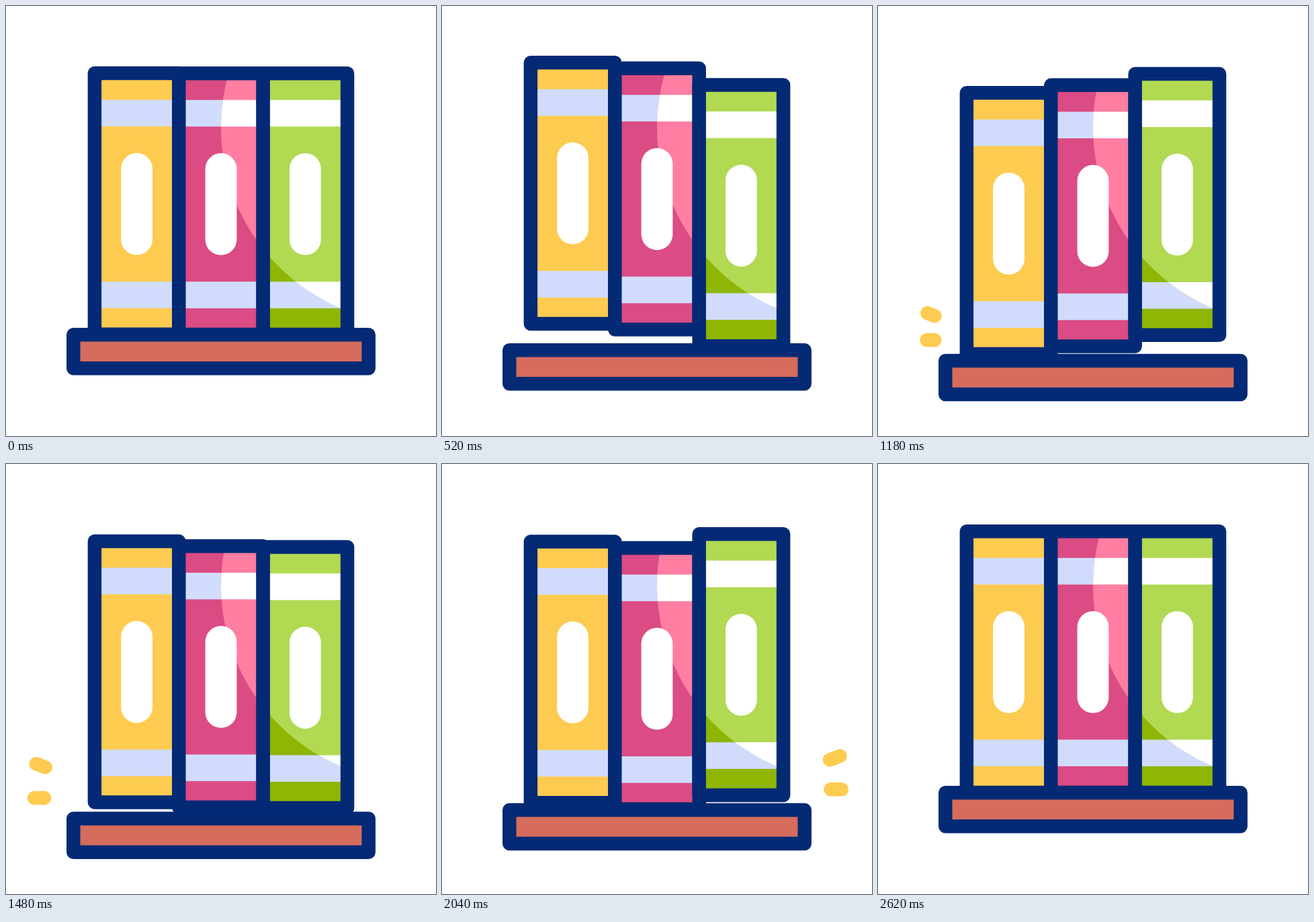
Write an HTML page with a canvas that moves like this. It is 640x640 px and loops after 3.6 s.

```html
<!DOCTYPE html>
<html lang="en">
<head>
<meta charset="utf-8">
<title>Bouncing books</title>
<style>
  html, body { margin: 0; width: 100%; height: 100%; overflow: hidden; background: #fff; }
  canvas { display: block; width: 640px; height: 640px; }
</style>
</head>
<body>
<canvas id="stage" width="640" height="640"></canvas>
<script>
const ctx = document.getElementById('stage').getContext('2d');
const LOOP = 3600, MOTION = 2620, HALF = MOTION / 2;
const NAVY = '#042a75', YELLOW = '#fdcb50', LAVENDER = '#d1dcfd', SHELF = '#d56c5c';
const BOOK_WIDTH = 125.4;

const books = [
  { x: 131.9, start: 0, rise: 420, dark: YELLOW, light: YELLOW },
  { x: 257.3, start: 225, rise: 600, dark: '#db4b84', light: '#ff7ea1' },
  { x: 382.7, start: 479, rise: 600, dark: '#8fb505', light: '#b1d952' },
];

const clamp = v => Math.min(1, Math.max(0, v));
const smooth = v => { v = clamp(v); return v * v * (3 - 2 * v); };
const bezier = (a, b, s) => 3 * a * s * (1 - s) ** 2 + 3 * b * s * s * (1 - s) + s ** 3;

function ease(u) {
  let low = 0, high = 1;
  for (let i = 0; i < 24; i++) {
    const mid = (low + high) / 2;
    if (bezier(0.333, 0.4, mid) < u) low = mid; else high = mid;
  }
  return bezier(0.25, 1, low);
}

const shelfDrop = t => t >= MOTION ? 0 : 39 * ease(1 - Math.abs(t - HALF) / HALF);

// Height above the shelf: one long jump, then two shorter bounces.
function jumpHeight(t, { start, rise }) {
  const age = t - start;
  const bounce = (from, half, height) => height * (1 - clamp(Math.abs(age - from - half) / half) ** 2);
  const up = clamp(1 - age / rise), down = clamp((age - 600) / 500);
  const jump = 39 * (1 - up ** 2.25 - down ** 2.3);
  return jump + bounce(1100, 355, 24) + bounce(1810, 160, 13);
}

function outline(x, y, w, h) {
  ctx.strokeStyle = NAVY;
  ctx.lineWidth = 20.5;
  ctx.lineJoin = 'round';
  ctx.strokeRect(x, y, w, h);
}

function fillBox(color, x, y, w, h) {
  ctx.fillStyle = color;
  ctx.fillRect(x, y, w, h);
}

function drawBook(book, dy) {
  const { x } = book;
  const paint = (cover, band) => {
    fillBox(cover, x, 100.3 + dy, BOOK_WIDTH, 388.7);
    fillBox(band, x, 139.8 + dy, BOOK_WIDTH, 39.6);
    fillBox(band, x, 410.3 + dy, BOOK_WIDTH, 39.6);
  };
  paint(book.dark, LAVENDER);
  ctx.save();
  ctx.beginPath();
  ctx.arc(612, 181, 292, 0, 7);
  ctx.clip();
  paint(book.light, '#fff');
  ctx.restore();

  ctx.fillStyle = '#fff';
  ctx.beginPath();
  ctx.roundRect(x + BOOK_WIDTH / 2 - 23.4, 219 + dy, 46.8, 151.8, 23.4);
  ctx.fill();
  outline(x, 100.3 + dy, BOOK_WIDTH, 388.7);
}

function drawSparks(age, side, dy) {
  const head = 48 * smooth(age / 640), tail = 48 * smooth((age - 160) / 640);
  if (head - tail < 0.05) return;
  ctx.strokeStyle = YELLOW;
  ctx.lineWidth = 20.5;
  ctx.lineCap = 'round';
  for (const [y, dirX, dirY] of [[423, 0.94, -0.35], [458.5, 1, 0]]) {
    ctx.beginPath();
    for (const d of [tail, head]) ctx.lineTo(320 + side * (234.3 + d * dirX), y + d * dirY + dy);
    ctx.stroke();
  }
}

function draw(t) {
  const drop = shelfDrop(t);
  fillBox('#fff', 0, 0, 640, 640);
  for (const book of books) drawBook(book, drop - jumpHeight(t, book));
  fillBox(SHELF, 100.3, 489.2 + drop, 439.4, 50);
  outline(100.3, 489.2 + drop, 439.4, 50);
  drawSparks(t - 960, -1, drop);
  drawSparks(t - 1560, 1, drop);
}

const begin = performance.now();
function frame() {
  draw((performance.now() - begin) % LOOP);
  requestAnimationFrame(frame);
}
frame();
</script>
</body>
</html>
```
